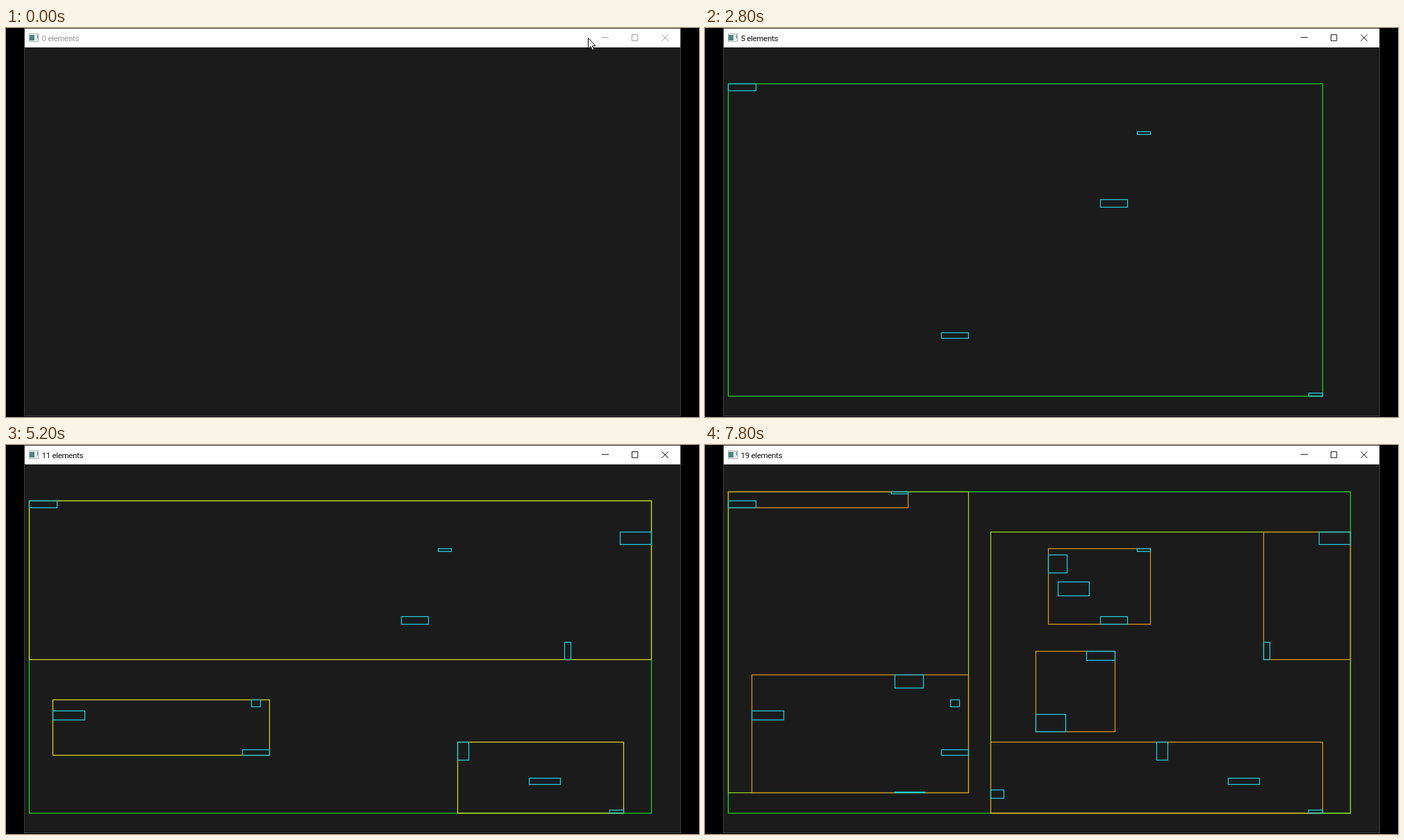
Write an HTML page that moves like this. It is 998 px wide and 561 px high and loops after 8 s.

```html
<!DOCTYPE html>
<html lang="en">
<head>
<meta charset="utf-8">
<title>Growing rectangle tree</title>
<style>
  html, body { margin: 0; width: 100%; height: 100%; overflow: hidden; background: #000; }
  svg { display: block; width: 998px; height: 561px; }
  text { font: 11.5px Roboto, "Open Sans", sans-serif; letter-spacing: -.3px; }
  #boxes { fill: none; stroke-width: 1.25; }
</style>
</head>
<body>
<svg viewBox="0 0 998 561">
  <rect width="998" height="561" fill="#010102"/>
  <rect x="26.5" y=".5" width="945" height="559" fill="#1b1b1c" stroke="#414142"/>
  <rect x="27" y="1" width="944" height="27" fill="#fff"/>
  <g>
    <rect x="33.5" y="8.5" width="13" height="11" fill="#f4f6f6" stroke="#a9b2b2"/>
    <rect x="34" y="10" width="7" height="8" fill="#4d8580"/>
    <path d="M43.5 10v8" stroke="#cfdde2"/>
    <path d="M45.5 10v5" stroke="#587ca5"/>
  </g>
  <text id="title" x="51.5" y="18.7"></text>
  <path id="buttons" d="M858 13.7h10M901.5 9.7h8.3v8.6h-8.3zM944.5 9.5l9.3 9.3M953.8 9.5l-9.3 9.3" fill="none"/>
  <g id="boxes"></g>
  <path id="cursor" d="M838.5 14.5v15.5l3.5-3.3 2.5 5.3 2.3-1-2.5-5.2h4.7z" fill="#fff" stroke="#000"/>
</svg>
<script>
const LOOP = 8000;
const CAPACITY = 5, MIN_FILL = 2;

// Bursts of insertions; each rectangle is left, top, right, bottom
const bursts = [
  { start: 200, gap: 800, rects: [[33, 80, 73, 90], [622, 149, 641, 153], [569, 247, 608, 258]] },
  { start: 2200, gap: 600, rects: [[340, 439, 379, 447], [869, 526, 889, 530.5]] },
  { start: 3600, gap: 400, rects: [[650, 428, 666, 454], [753, 480, 798, 489]] },
  { start: 4200, gap: 200, rects: [[884, 125, 929, 143], [804, 284, 813, 309], [353, 367, 366, 377]] },
  { start: 5000, gap: 400, rects: [[67, 383, 113, 396], [476, 388, 519, 413], [273, 331, 314, 350]] },
  { start: 6600, gap: 200, rects: [[508, 197, 553, 217], [494, 158, 521, 184], [549, 297, 590, 310],
    [268, 67, 292, 70], [411, 497, 430, 509]] },
  { start: 7800, gap: 0, rects: [[273, 500, 316, 501]] }
];
const items = bursts.flatMap(({ start, gap, rects }) =>
  rects.map((box, i) => ({ time: start + i * gap, box })));

const sum = list => list.reduce((a, b) => a + b, 0);
const minBy = (list, score) => list.reduce((a, b) => score(b) < score(a) ? b : a);
const area = ([l, t, r, b]) => (r - l) * (b - t);
const margin = ([l, t, r, b]) => r - l + b - t;
const bounds = nodes => nodes.map(boxOf).reduce(([l, t, r, b], [l2, t2, r2, b2]) =>
  [Math.min(l, l2), Math.min(t, t2), Math.max(r, r2), Math.max(b, b2)]);
const boxOf = node => node.box || bounds(node.kids);
const growth = (node, item) => area(bounds([node, item])) - area(boxOf(node));

// R*-style split: axis with the smallest margins, then the cut with the smallest area
function split({ kids }) {
  const cost = (pair, measure) => sum(pair.map(half => measure(bounds(half))));
  const cutsAlong = edge => {
    const sorted = [...kids].sort((a, b) => boxOf(a)[edge] - boxOf(b)[edge]);
    const cuts = [];
    for (let n = MIN_FILL; n <= sorted.length - MIN_FILL; n++) {
      cuts.push([sorted.slice(0, n), sorted.slice(n)]);
    }
    return cuts;
  };
  const cuts = minBy([cutsAlong(2), cutsAlong(3)], axis => sum(axis.map(cut => cost(cut, margin))));
  return minBy(cuts, cut => cost(cut, area)).map(half => ({ kids: half }));
}

function insert({ kids }, item) {
  if (!kids.length || kids[0].box) return kids.push(item);
  const target = minBy(kids, kid => growth(kid, item));
  insert(target, item);
  if (target.kids.length > CAPACITY) kids.splice(kids.indexOf(target), 1, ...split(target));
}

// An overfull root is split only when the next item arrives
function buildTree(list) {
  let root = { kids: [] };
  for (const item of list) {
    if (root.kids.length > CAPACITY) root = { kids: split(root) };
    insert(root, item);
  }
  return root;
}

function outline(node, color) {
  const [l, t, r, b] = boxOf(node);
  return `<rect x="${l + .5}" y="${t + .5}" width="${r - l}" height="${b - t}" stroke="${color}"/>`;
}

function treeMarkup(list) {
  if (!list.length) return '';
  const levels = [[buildTree(list)]];
  while (!levels.at(-1)[0].box) levels.push(levels.at(-1).flatMap(node => node.kids));
  const height = levels.length - 1;
  return levels.flatMap((nodes, depth) => {
    const color = depth === height ? '#22cfd8' : `hsl(${120 * (1 - depth / height)}, 76%, 48%)`;
    return nodes.map(node => outline(node, color));
  }).join('');
}

const byId = id => document.getElementById(id);
const title = byId('title'), buttons = byId('buttons'), boxes = byId('boxes'), cursor = byId('cursor');
let lastCount = -1;

function draw(time) {
  const shown = items.filter(item => time >= item.time);
  if (shown.length === lastCount) return;
  lastCount = shown.length;
  const active = lastCount > 0;
  title.textContent = `${lastCount} elements`;
  title.setAttribute('fill', active ? '#111' : '#949494');
  buttons.setAttribute('stroke', active ? '#111' : '#999');
  cursor.style.display = lastCount < 3 ? '' : 'none';
  boxes.innerHTML = treeMarkup(shown);
}

const start = performance.now();
function tick() {
  draw((performance.now() - start) % LOOP);
  requestAnimationFrame(tick);
}
tick();
</script>
</body>
</html>
```
